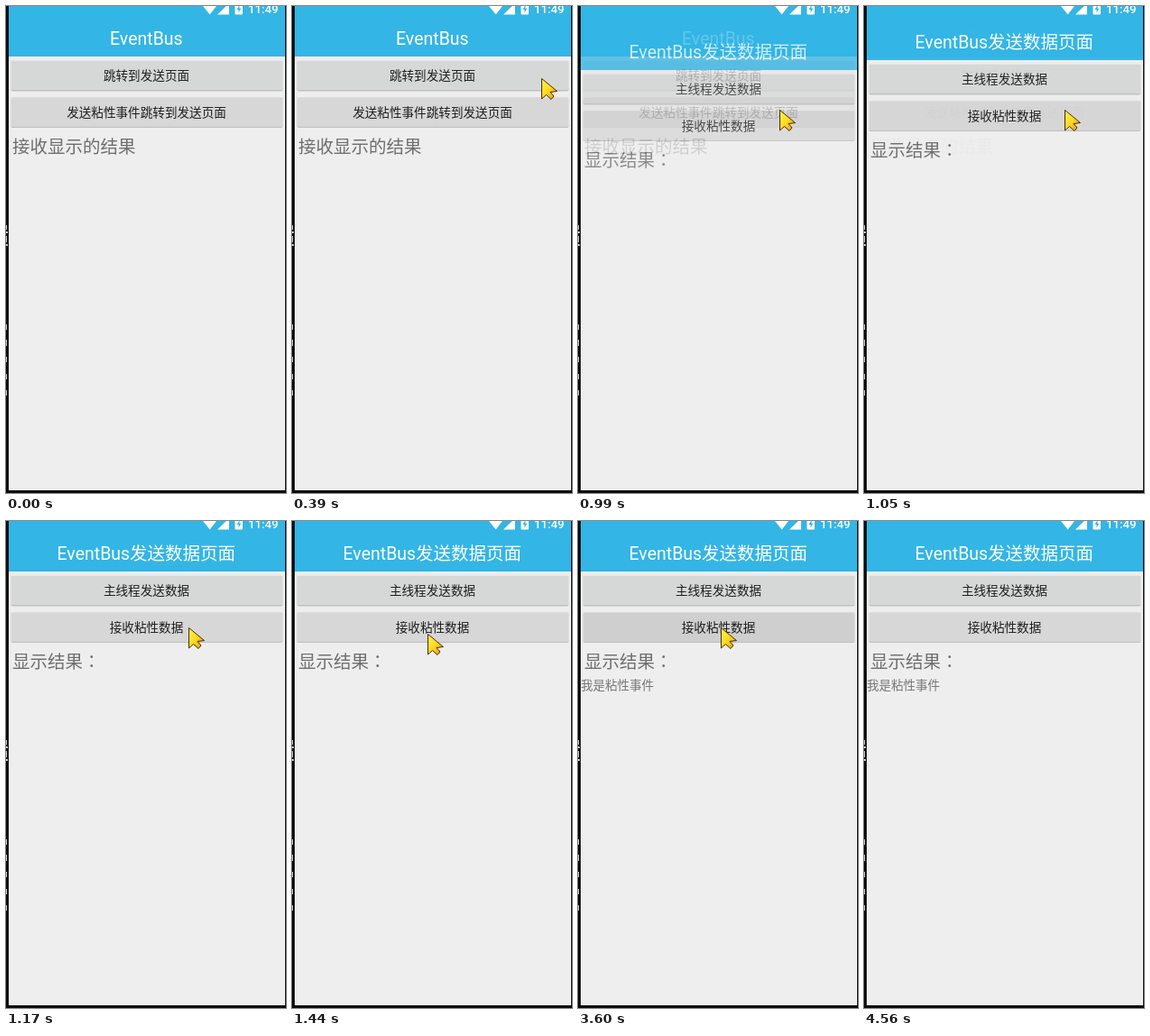
Animation of 310x540 px, one loop 7140 ms. Source, as an HTML page:

```html
<!DOCTYPE html>
<html lang="zh-CN">
<head>
<meta charset="utf-8">
<style>
  html, body { margin: 0; width: 100%; height: 100%; overflow: hidden; background: #0a0b0d; }
  svg { display: block; width: 310px; height: 540px; }
  text { font-family: Roboto, "Noto Sans CJK SC", "Noto Sans CJK", sans-serif; }
  .title { font-size: 19.5px; fill: #fff; text-anchor: middle; }
  .label { font-size: 13.6px; fill: #1e1e1e; text-anchor: middle; }
  .result { font-size: 19.5px; fill: #6e6e6e; }
  .message { font-size: 13.5px; fill: #767676; }
  .colon { font-family: "Noto Sans CJK TC", "Noto Sans CJK", sans-serif; }
</style>
</head>
<body>
<svg viewBox="0 0 310 540">
  <defs>
    <clipPath id="screen"><rect x="3" width="306" height="537"/></clipPath>
    <linearGradient id="gold" x1="0" y1="0" x2="1" y2="1">
      <stop offset="0" stop-color="#fff25a"/>
      <stop offset=".5" stop-color="#ffd91f"/>
      <stop offset="1" stop-color="#e88a10"/>
    </linearGradient>
  </defs>
  <rect width="310" height="540" fill="#0a0b0d"/>
  <g fill="#c9cccf">
    <path d="M0 243h1v5h-1zM0 250h2v2h-2zM0 255h1v7h-1zM0 264h2v2h-2z"/>
    <path d="M0 353h1v6h-1zM0 370h1v7h-1zM0 389h1v6h-1zM0 408h1v6h-1zM0 426h1v6h-1z"/>
  </g>
  <g clip-path="url(#screen)">
    <g id="first"></g>
    <g id="second"></g>
    <g fill="#fff">
      <path d="M218 0H233L225.7 9.5ZM234 9.5L247 -3V9.5Z"/>
      <rect x="253.500" y="-4" width="8.500" height="13.500" rx="1"/>
      <path d="M258.600 -1L255.500 4H257.500V7.500L260.300 2.800H258.400Z" fill="#33b5e5"/>
      <text x="268" y="8.300" font-size="13.200" font-weight="500">11:49</text>
    </g>
  </g>
  <path id="cursor" d="M.5 .5V23L5.500 18.500L11 23.500L14 20L10 15.500L17.500 14.500Z"
        fill="url(#gold)" stroke="#4a2c08" stroke-linejoin="round"/>
</svg>
<script>
const LOOP = 7140, STEP = 30;
const $ = id => document.getElementById(id);
const clamp = v => Math.max(0, Math.min(1, v));
const smooth = p => p * p * (3 - 2 * p);
const easeOut = (p, power) => 1 - (1 - p) ** power;

const button = (y, label, id) => `
  <rect x="5.500" y="${y + 1.3}" width="301" height="32.200" rx="2" fill="#bfc0c0"/>
  <rect x="5" y="${y - .5}" width="302" height="32.500" rx="2" fill="#e2e2e2"/>
  <rect id="${id}" x="6" y="${y}" width="300" height="32" rx="1.500" fill="#d6d7d7"/>
  <text class="label" x="155.500" y="${y + 21}">${label}</text>`;

const page = (name, title, labels, result) => `
  <rect x="3" width="306" height="537" fill="#eee"/>
  <rect x="3" width="306" height="56" fill="#33b5e5"/>
  <text class="title" x="155.300" y="42.700">${title}</text>
  ${button(61, labels[0], name + "Top")}
  ${button(101.5, labels[1], name + "Sticky")}
  <text class="result" x="7" y="163">${result}</text>`;

$("first").innerHTML = page("first", "EventBus",
  ["跳转到发送页面", "发送粘性事件跳转到发送页面"], "接收显示的结果");
$("second").innerHTML = page("second", "EventBus发送数据页面",
  ["主线程发送数据", "接收粘性数据"], '显示结果<tspan class="colon" lang="zh-TW">：</tspan>') +
  '<text id="message" class="message" x="3" y="187">我是粘性事件</text>';

// Each move: start, end, target x, target y
const moves = [
  [90, 780, 223, 115],
  [1020, 1440, 150, 125],
  [2670, 2700, 150, 124],
  [2700, 2790, 158, 118],
  [4350, 4560, 311, 56]
];

function cursorAt(t) {
  let x = 311, y = 56;
  for (const [start, end, toX, toY] of moves) {
    const p = smooth(clamp((t - start) / (end - start)));
    x += (toX - x) * p;
    y += (toY - y) * p;
  }
  return [Math.round(x), Math.round(y)];
}

function grey(level) {
  const v = Math.round(level);
  return `rgb(${v},${v},${v})`;
}

function draw(time) {
  const t = Math.floor(time % LOOP / STEP) * STEP;
  const [x, y] = cursorAt(t);
  $("cursor").setAttribute("transform", `translate(${x} ${y})`);
  $("cursor").setAttribute("visibility", t >= 120 && t < 4560 ? "visible" : "hidden");

  const rise = easeOut(clamp((t - 930) / 325), 5);
  const shift = Math.round(43 * (1 - rise));
  $("second").setAttribute("transform", `translate(0 ${shift})`);
  $("second").setAttribute("opacity", easeOut(clamp((t - 930) / 200), 4));

  $("firstSticky").setAttribute("fill", grey(215 - 13 * clamp((t - 840) / 90)));
  const pressed = t >= 3270 && t < 4380;
  const level = pressed ? (t < 3450 ? 203 : 207) : 215;
  $("secondSticky").setAttribute("fill", grey(level));
  $("message").setAttribute("visibility", t >= 3360 ? "inherit" : "hidden");
}

const begin = performance.now();
function tick() {
  draw(performance.now() - begin);
  requestAnimationFrame(tick);
}
draw(0);
requestAnimationFrame(tick);
</script>
</body>
</html>
```
